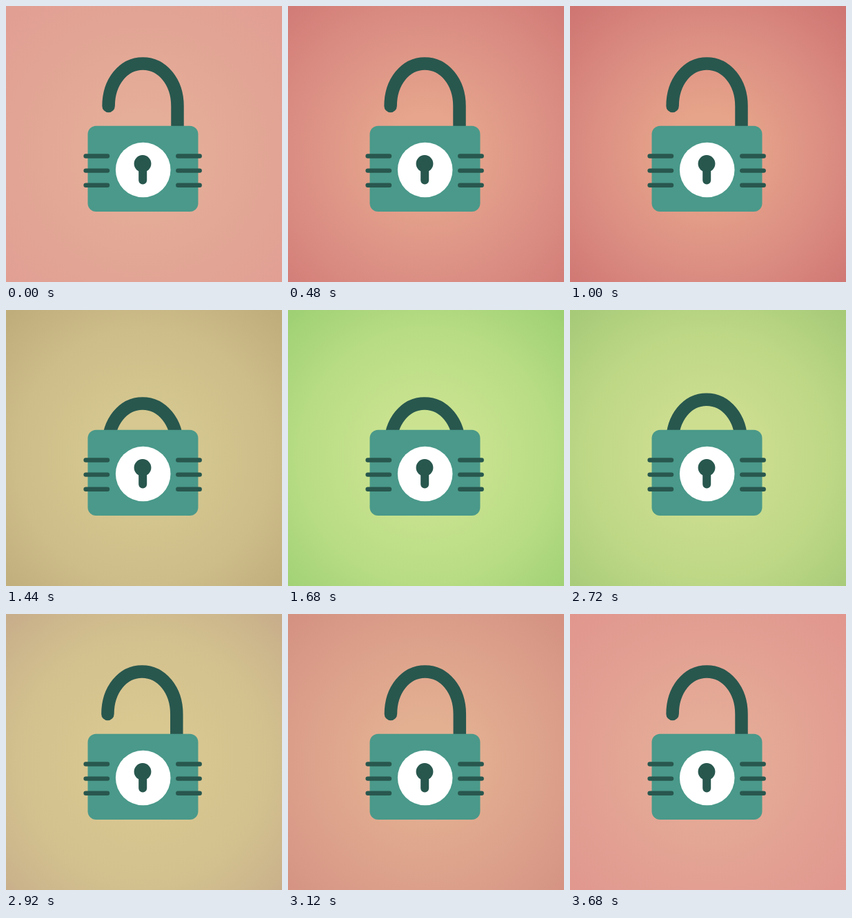
Animation of 400x400 px, one loop 3.72 s. Source, as an HTML page:

```html
<!DOCTYPE html>
<html lang="en">
<head>
<meta charset="utf-8">
<title>Padlock</title>
<style>
html, body { margin: 0; width: 100%; height: 100%; overflow: hidden; }
svg { display: block; width: 100vw; height: 100vh; }
</style>
</head>
<body>
<svg viewBox="0 0 400 400">
  <defs>
    <radialGradient id="glow" gradientUnits="userSpaceOnUse" cx="200" cy="212" r="285">
      <stop offset=".2"/><stop offset=".65"/><stop offset="1"/>
    </radialGradient>
  </defs>
  <rect width="400" height="400" fill="url(#glow)"/>
  <g fill="none" stroke="#28574e" stroke-linecap="round">
    <path id="shackle" stroke-width="18.5" d="M148.6 145C148.6 110 170 83.4 198.3 83.4S248.5 110 248.5 145V190"/>
    <rect x="118.5" y="173.8" width="160" height="124.2" rx="12" fill="#4a998a" stroke="none"/>
    <circle cx="198.7" cy="237.5" r="39.8" fill="#fff" stroke="none"/>
    <circle cx="198" cy="228.5" r="12.4" fill="#28574e" stroke="none"/>
    <path stroke-width="12" d="M198.2 229V252.5"/>
    <path stroke-width="6.4" d="M115.6 217.5H147M115.6 238.6H147M115.6 259.7H147M249.3 217.5H280.7M249.3 238.6H280.7M249.3 259.7H280.7"/>
  </g>
</svg>
<script>
const LOOP = 3720;
const stops = document.querySelectorAll('#glow stop');
const shackle = document.getElementById('shackle');

// Colours from the middle of the glow to its rim
const red = ['#e6a48a', '#da8b81', '#cf7672'];
const tan = ['#d6c890', '#cdbd89', '#bfad7b'];
const green = ['#cbe391', '#b7dc83', '#9fd074'];
const sand = ['#dac891', '#d2c08e', '#c8ae8b'];
const rose = ['#e6a792', '#e09488', '#d9877f'];
const pink = ['#e5ac97', '#e29f92', '#e1978e'];
const pale = ['#e5ae98', '#e2a595', '#e19e93'];

const moods = [
  [0, pale], [560, red], [1200, red], [1440, tan], [1660, green],
  [2680, green], [2920, sand], [3200, rose], [3680, pink], [LOOP, pale]
];

const clamp = v => Math.min(1, Math.max(0, v));
const smooth = v => v * v * (3 - 2 * v);
const span = (t, a, b) => clamp((t - a) / (b - a));
const rgb = hex => [1, 3, 5].map(i => parseInt(hex.slice(i, i + 2), 16));

function mix(a, b, k) {
  const to = rgb(b);
  return `rgb(${rgb(a).map((v, i) => (v + (to[i] - v) * k).toFixed(1))})`;
}

function draw(t) {
  let i = 0;
  while (i < moods.length - 2 && t >= moods[i + 1][0]) i++;
  const [start, from] = moods[i], [end, to] = moods[i + 1];
  const k = span(t, start, end);
  stops.forEach((s, n) => s.setAttribute('stop-color', mix(from[n], to[n], k)));

  const shut = smooth(span(t, 1200, 1400)) - smooth(span(t, 2680, 2880));
  const since = t - 2840;
  const sway = since > 0 ? -2 * Math.exp(-since / 160) * Math.sin(since / 55) : 0;
  shackle.setAttribute('transform', `translate(${(sway - 0.4 * shut).toFixed(2)} ${(52 * shut).toFixed(2)})`);
}

function tick() {
  draw(performance.now() % LOOP);
  requestAnimationFrame(tick);
}
tick();
</script>
</body>
</html>
```
